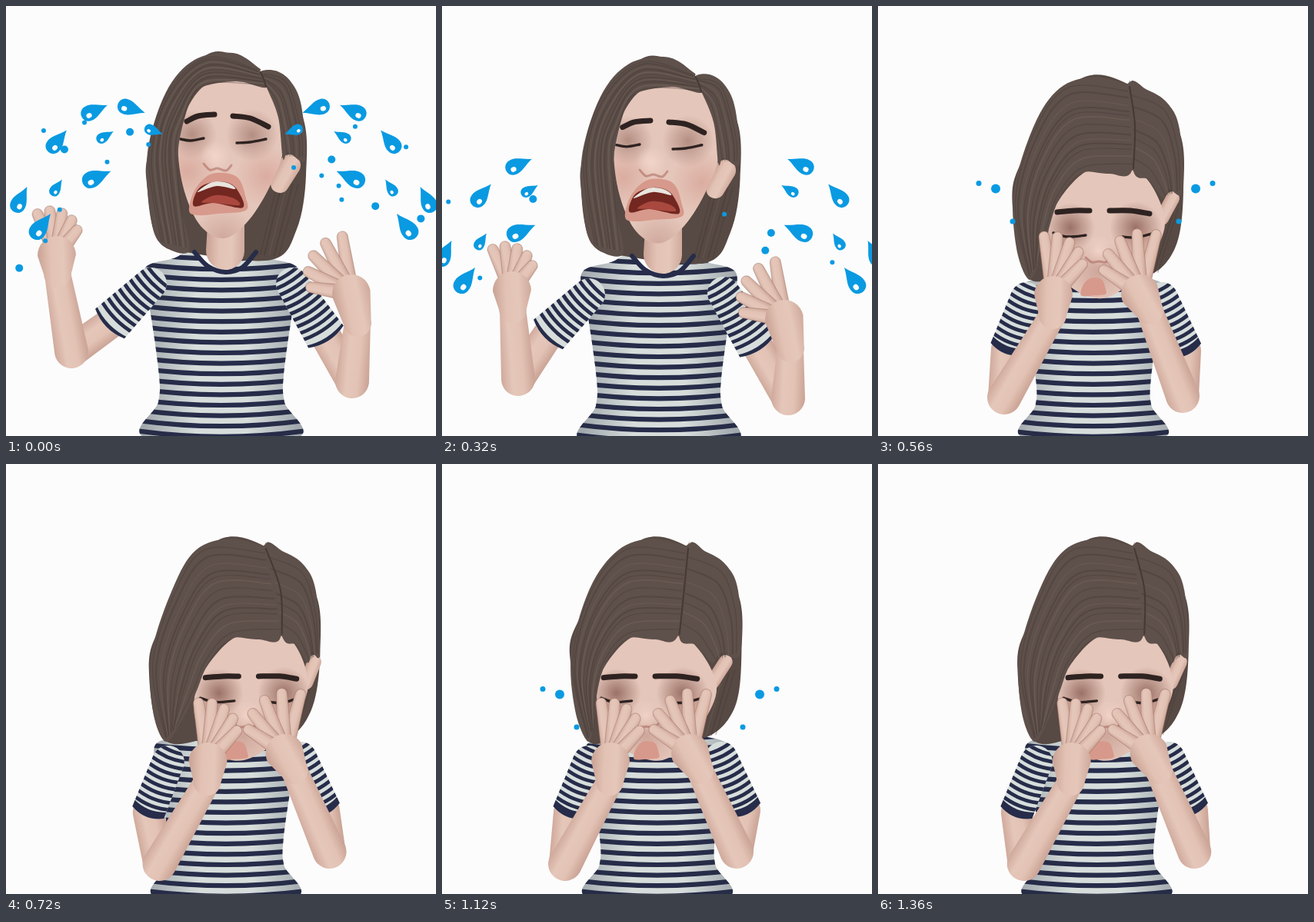
Animation of 559 by 559 pixels, one loop 1440 ms. Source, as an HTML page with a canvas:

```html
<!DOCTYPE html>
<html lang="en">
<head>
<meta charset="utf-8">
<title>Crying</title>
<style>
  html, body { margin: 0; width: 100%; height: 100%; overflow: hidden; background: #fcfcfc; }
  canvas { display: block; }
</style>
</head>
<body>
<canvas id="stage" width="559" height="559"></canvas>
<script>
const ctx = document.getElementById('stage').getContext('2d');
const LOOP = 1440, STEP = 80, MIDDLE = 283;
const PAPER = '#fcfcfc', NAVY = '#262c49', CLOTH = '#d6dddb', HAIR = '#5e504a',
  STRAND = '#443936', LASH = '#2e2321', BLUE = '#0a9ae2';

const lerp = (a, b, k) => a + (b - a) * k;
const mix = (p, q, k) => p.map((v, i) => lerp(v, q[i], k));
const clamp = k => Math.min(1, Math.max(0, k));
const ease = k => k * k * (3 - 2 * k);
const pairs = s => s.match(/-?\d+ -?\d+/g).map(p => p.split(' ').map(Number));
const random = n => { const v = Math.sin(n * 127.1 + 3.7) * 43758.5; return v - Math.floor(v); };

// How each part sinks and lifts while wailing, then rests and swings behind the hands
const motion = {
  edge:    { sink: [-3, 4],   lift: [1, -6],  rest: [2, 5],   swing: 9 },
  mid:     { sink: [0, 8],    lift: [2, -7],  rest: [2, 10],  swing: 26 },
  body:    { sink: [2, 5],    lift: [0, -4],  rest: [3, 2],   swing: 3 },
  sleeveL: { sink: [3, 14],   lift: [2, -4],  rest: [8, 7],   swing: 10 },
  sleeveR: { sink: [-6, 12],  lift: [4, 0],   rest: [4, 2],   swing: 10 },
  handL:   { sink: [25, 46],  lift: [2, -6],  rest: [13, 11], swing: 22 },
  handR:   { sink: [-4, 33],  lift: [12, 2],  rest: [2, 2],   swing: 20 },
  elbowL:  { sink: [14, 36],  lift: [4, -5],  rest: [16, 11], swing: 20 },
  elbowR:  { sink: [0, 22],   lift: [11, -4], rest: [6, -3],  swing: 19 }
};
const offset = {};
let cover = 0;

function setPose(t) {
  cover = ease(clamp((t - 320) / 240));
  const sinking = clamp(t / 320) ** 2 * (1 - cover);
  const lifting = Math.sin(Math.PI * clamp(t / 320));
  const resting = ease(clamp((t - 560) / 160));
  const swinging = Math.sin(2 * Math.PI * Math.max(0, t - 560) / 740);
  for (const part in motion) {
    const { sink, lift, rest, swing } = motion[part];
    offset[part] = [0, 1].map(i => sink[i] * sinking + lift[i] * lifting + rest[i] * resting);
    offset[part][0] += swing * swinging;
  }
}

// The head turns, so the face moves further than the outline of the hair
function move([x, y], part) {
  let d = offset[part];
  if (part === 'head') {
    const far = Math.hypot((x - 286) / 112, (y - lerp(190, 240, cover)) / 145);
    d = mix(offset.mid, offset.edge, clamp(far) ** 4);
  }
  return [x + d[0], y + d[1]];
}
const spot = (part, wail, hide) => move(mix(wail, hide, cover), part);

function pose(part, wail, hide) {
  const b = pairs(hide);
  return pairs(wail).map((p, i) => spot(part, p, b[i]));
}

function spline(pts, closed = true) {
  const n = pts.length, path = new Path2D();
  const at = i => pts[closed ? (i + n) % n : Math.max(0, Math.min(n - 1, i))];
  path.moveTo(...pts[0]);
  for (let i = 0; i < (closed ? n : n - 1); i++) {
    const [a, b, c, d] = [at(i - 1), at(i), at(i + 1), at(i + 2)];
    path.bezierCurveTo(b[0] + (c[0] - a[0]) / 6, b[1] + (c[1] - a[1]) / 6,
      c[0] - (d[0] - b[0]) / 6, c[1] - (d[1] - b[1]) / 6, ...c);
  }
  if (closed) path.closePath();
  return path;
}

function fill(path, color) {
  ctx.fillStyle = color;
  ctx.fill(path);
}
function stroke(path, color, width) {
  ctx.strokeStyle = color;
  ctx.lineWidth = width;
  ctx.stroke(path);
}
const line = (pts, color, width) => stroke(spline(pts, false), color, width);

function gradient(x0, y0, x1, y1, ...colors) {
  const g = ctx.createLinearGradient(x0, y0, x1, y1);
  colors.forEach((c, i) => g.addColorStop(i / (colors.length - 1), c));
  return g;
}

function glow(wail, hide, r, rgb, alpha) {
  const [x, y] = spot('head', wail, hide);
  const g = ctx.createRadialGradient(x, y, 0, x, y, r);
  g.addColorStop(0, `rgba(${rgb},${alpha})`);
  g.addColorStop(1, `rgba(${rgb},0)`);
  ctx.fillStyle = g;
  ctx.fillRect(x - r, y - r, 2 * r, 2 * r);
}

// Tapered round-ended piece of skin
function limb([ax, ay], ra, [bx, by], rb, outline) {
  const turn = Math.atan2(by - ay, bx - ax), q = Math.PI / 2, path = new Path2D();
  path.arc(ax, ay, ra, turn + q, turn + 3 * q);
  path.arc(bx, by, rb, turn - q, turn + q);
  path.closePath();
  const r = Math.max(ra, rb), nx = Math.cos(turn + q) * r, ny = Math.sin(turn + q) * r;
  const x = (ax + bx) / 2, y = (ay + by) / 2;
  fill(path, gradient(x - nx, y - ny, x + nx, y + ny, '#cfa99b', '#e5c7ba', '#e2c2b4', '#c9a294'));
  if (outline) stroke(path, 'rgba(150,105,92,.4)', 1.2);
}

function band(y, half, sag, width) {
  const path = new Path2D();
  path.moveTo(-half, y);
  path.quadraticCurveTo(0, y + sag, half, y);
  stroke(path, NAVY, width);
}

function torso() {
  const half = pairs('0 346 38 320 62 328 98 339 100 365 92 400 81 480 82 515 96 562');
  const right = half.map(([x, y]) => [
    x * lerp(1, .92, cover), y + 24 * cover * (562 - y) / 244]);
  const left = right.slice(1).reverse().map(([x, y]) => [-x, y]);
  const [dx, dy] = offset.body;
  ctx.save();
  ctx.translate(280 + dx, dy);
  const path = spline([...right, ...left]);
  fill(path, CLOTH);
  ctx.clip(path);
  for (let y = 306; y < 575; y += 13.6) band(y, 120, 18, 6.2);
  ctx.fillStyle = gradient(-100, 0, 100, 0,
    'rgba(40,45,65,.3)', 'rgba(40,45,65,0)', 'rgba(40,45,65,0)', 'rgba(40,45,65,.3)');
  ctx.fillRect(-120, 300, 240, 275);
  ctx.restore();
}

function sleeve(shoulder, cuff) {
  const dx = cuff[0] - shoulder[0], dy = cuff[1] - shoulder[1], len = Math.hypot(dx, dy);
  const w = lerp(27, 22, cover), path = new Path2D();
  path.moveTo(-w, 0);
  path.quadraticCurveTo(0, 12, w, 0);
  path.lineTo(21, -len);
  path.arc(0, -len, 21, 0, Math.PI, true);
  path.closePath();
  ctx.save();
  ctx.translate(...cuff);
  ctx.rotate(Math.atan2(dy, dx) - Math.PI / 2);
  fill(path, CLOTH);
  ctx.clip(path);
  band(0, w + 5, 12, lerp(10, 20, cover));
  for (let y = -14; y > -len - 20; y -= 9.5) band(y, w + 5, 9, 4.8);
  ctx.restore();
}

// Five fingers fan out from the palm; angles are in degrees from straight up
function hand(center, wrist, mirror, start, step, reach) {
  for (let i = 0; i < 5; i++) {
    const a = mirror * (start + i * step) * Math.PI / 180, len = reach * (1 - .017 * i * i);
    const along = d => [center[0] + Math.sin(a) * d, center[1] - Math.cos(a) * d];
    limb(along(16), 9.5, along(len - 5), 7, true);
  }
  limb(center, 25, wrist, 18);
}

function strands(outer, inner, count) {
  for (let i = 1; i < count; i++) {
    const u = i / count + Math.sin(i * 5) * .02;
    line(outer.map((p, j) => mix(p, inner[j], u)),
      i % 3 ? STRAND + '66' : '#75665e66', i % 2 ? 1.2 : 2);
  }
}

function backHair() {
  fill(spline(pose('head',
    '190 180 184 240 198 305 240 321 345 330 378 290 390 220 384 140 330 86 260 64',
    '188 200 175 262 196 354 260 345 345 352 386 315 397 240 390 160 330 104 260 97')), '#574943');
  strands(pose('head', '386 230 360 325', '395 260 368 346'),
    pose('head', '345 235 325 322', '362 280 340 348'), 6);
}

// The mouth keeps its drawing and shrinks as the hands arrive
function mouthPart(text, color) {
  const [x, y] = spot('head', [276, 246], [280, 366]), size = lerp(1, .44, cover);
  fill(spline(pairs(text).map(p => [x + p[0] * size, y + p[1] * size])), color);
}

function face() {
  limb(spot('head', [369, 207], [383, 250]), lerp(14, 9, cover),
    spot('head', [356, 231], [369, 276]), lerp(12, 9, cover));
  const outline = spline(pose('head',
    '226 160 255 106 300 97 340 106 360 180 345 230 316 278 283 302 250 282 228 225',
    '230 262 266 218 300 214 345 220 373 280 350 335 318 368 285 380 245 360 222 310'));
  fill(outline, '#e5c6ba');
  ctx.save();
  ctx.clip(outline);
  const deep = lerp(.5, .75, cover);
  glow([242, 167], [250, 288], 32, '130,85,75', deep);
  glow([320, 168], [335, 288], 34, '130,85,75', deep);
  glow([236, 215], [232, 330], 38, '200,125,112', .35);
  glow([338, 222], [345, 325], 40, '200,125,112', .35);
  glow([283, 304], [285, 345], 42, '165,110,98', .35);
  glow([272, 195], [287, 318], 20, '246,216,204', .8);
  ctx.restore();

  line(pose('head', '257 205 265 213 275 211 286 214 293 207',
    '270 327 278 333 287 332 296 333 304 327'), 'rgba(165,95,85,.5)', 3);
  mouthPart('-38 20 -30 -8 -8 -28 24 -24 36 4 35 20 -1 24 -26 26', '#d7998b');
  if (cover < .7) {
    mouthPart('-32 14 -26 -8 -8 -17 10 -17 24 -8 32 16 -6 10', '#722720');
    mouthPart('-22 9 -4 0 20 4 27 13 -6 10', '#a9483e');
    mouthPart('-27 -4 -8 -17 12 -16 22 -8 -2 -12', '#e9e4de');
  }
  line(pose('head', '227 173 240 175 257 172', '228 295 246 300 270 298'), LASH, 3.4);
  line(pose('head', '300 178 317 177 338 173', '318 300 335 301 356 296'), LASH, 3.4);
  line(pose('head', '235 150 250 143 271 141', '233 268 255 266 275 266'), LASH, 7);
  line(pose('head', '295 143 318 146 341 157', '301 266 328 266 353 270'), LASH, 7);
}

function frontHair() {
  fill(spline(pose('head',
    '330 86 350 84 370 98 384 130 389 200 367 190 360 198 354 145 338 104',
    '326 104 350 109 376 126 392 160 396 242 378 238 370 250 352 226 331 211')), HAIR);
  strands(pose('head', '334 86 368 98 387 165 388 196', '328 104 375 125 393 180 395 238'),
    pose('head', '338 104 350 130 357 165 362 194', '332 212 350 225 362 240 370 248'), 8);
  fill(spline(pose('head',
    '331 86 328 80 295 61 245 70 208 112 184 190 187 265 200 308 238 318 225 250 224 185 240 122 256 105 300 98 338 106',
    '328 104 322 101 280 92 236 107 203 155 177 240 180 315 197 356 212 325 222 290 232 258 246 233 268 216 300 218 331 211')), HAIR);
  strands(pose('head', '326 82 262 65 208 112 184 200 200 306', '324 105 246 100 201 160 176 255 196 352'),
    pose('head', '337 104 256 105 229 155 223 195 236 314', '331 211 268 216 236 250 222 288 208 335'), 14);
  line(pose('head', '331 86 335 95 338 105', '327 105 334 155 332 211'), STRAND, 2);
}

function person() {
  const elbowL = spot('elbowL', [85, 449], [164, 509]);
  const elbowR = spot('elbowR', [450, 488], [396, 507]);
  const wristL = spot('handL', [67, 348], [227, 402]);
  const wristR = spot('handR', [457, 412], [353, 396]);
  const cuffL = spot('sleeveL', [135, 413], [167, 446]);
  const cuffR = spot('sleeveR', [416, 430], [400, 448]);

  limb(elbowL, 21, cuffL, 20);
  limb(elbowR, 21, cuffR, 20);
  torso();
  sleeve(spot('sleeveL', [188, 361], [193, 380]), cuffL);
  sleeve(spot('sleeveR', [372, 361], [369, 380]), cuffR);
  backHair();
  limb(spot('body', [286, 285], [286, 320]), 24, spot('body', [285, 318], [285, 345]), 25);
  line(pose('body', '245 320 262 338 285 346 307 340 325 320',
    '245 350 262 366 285 370 307 366 325 350'), NAVY, 6);
  face();
  frontHair();
  limb(elbowL, 22, wristL, 17);
  limb(elbowR, 22, wristR, 17);
  hand(spot('handL', [66, 324], [228, 376]), wristL, 1,
    lerp(-25, -9, cover), lerp(16, 13, cover), lerp(64, 82, cover));
  hand(spot('handR', [449, 374], [341, 374]), wristR, -1,
    lerp(9, -15, cover), 18, lerp(80, 84, cover));
}

// Streams of tears are parabolas, measured outwards from the middle of the head
const streams = [
  { top: 130, peak: 140, bend: .0079, first: 120, gap: 48, count: 4, size: 37 },
  { top: 158, peak: 115, bend: .0075, first: 91, gap: 63, count: 3, size: 25 },
  { top: 215, peak: 130, bend: .0062, first: 165, gap: 72, count: 2, size: 40 }
];
const tearShape = new Path2D(
  'M.5 0C.2-.1 0-.3-.24-.27C-.58-.25-.58 .25-.24 .27C0 .3 .2 .1 .5 0Z');

function tear(x, y, size, angle) {
  ctx.save();
  ctx.translate(x, y);
  ctx.rotate(angle);
  ctx.scale(size, size);
  fill(tearShape, BLUE);
  ctx.beginPath();
  ctx.ellipse(-.24, .08, .1, .085, 0, 0, 7);
  ctx.fillStyle = PAPER;
  ctx.fill();
  ctx.restore();
}

function dot(x, y, r) {
  ctx.beginPath();
  ctx.arc(x, y, r, 0, 7);
  ctx.fillStyle = BLUE;
  ctx.fill();
}

// Drawn for the left side; the right side mirrors it
function fountain(t, seed) {
  const falling = t >= 240, out = falling ? 15 + (t - 320) * .12 : 0;
  const down = falling ? 70 + (t - 320) * .35 : 0;
  for (const { top, peak, bend, first, gap, count, size } of streams) {
    for (let i = 0; i < count; i++) {
      const far = first + i * gap, rise = far - peak;
      if (falling && far < 150) continue;
      tear(-far - out, top + bend * rise * rise + down, size, -Math.atan(2 * bend * rise));
    }
  }
  for (let i = 0; i < (falling ? 4 : 9); i++) {
    const n = seed + i + Math.floor(t / 160) * 40, far = 80 + 195 * random(n);
    dot(-far, 145 + down + far * .75 * random(n + 20) + t % 160 / 20, i % 3 ? 3 : 5);
  }
}

function burst(age, y) {
  for (let i = 0; i < 3; i++) {
    dot(-108 - 22 * i - age * .25, y + 30 * Math.cos(2 * i) + age * .05, i === 1 ? 6 : 3.5);
  }
}

function weep(t) {
  for (const side of [1, -1]) {
    ctx.save();
    ctx.translate(MIDDLE, 0);
    ctx.scale(side, 1);
    if (t < 480) fountain(t, side * 9);
    else if (t >= 560 && t < 720) burst(t - 560, 250);
    else if (t >= 1120 && t < 1280) burst(t - 1120, 312);
    ctx.restore();
  }
}

function draw() {
  const t = Math.floor(performance.now() % LOOP / STEP) * STEP;
  setPose(t);
  ctx.fillStyle = PAPER;
  ctx.fillRect(0, 0, 559, 559);
  ctx.lineCap = ctx.lineJoin = 'round';
  person();
  weep(t);
  requestAnimationFrame(draw);
}
draw();
</script>
</body>
</html>
```
